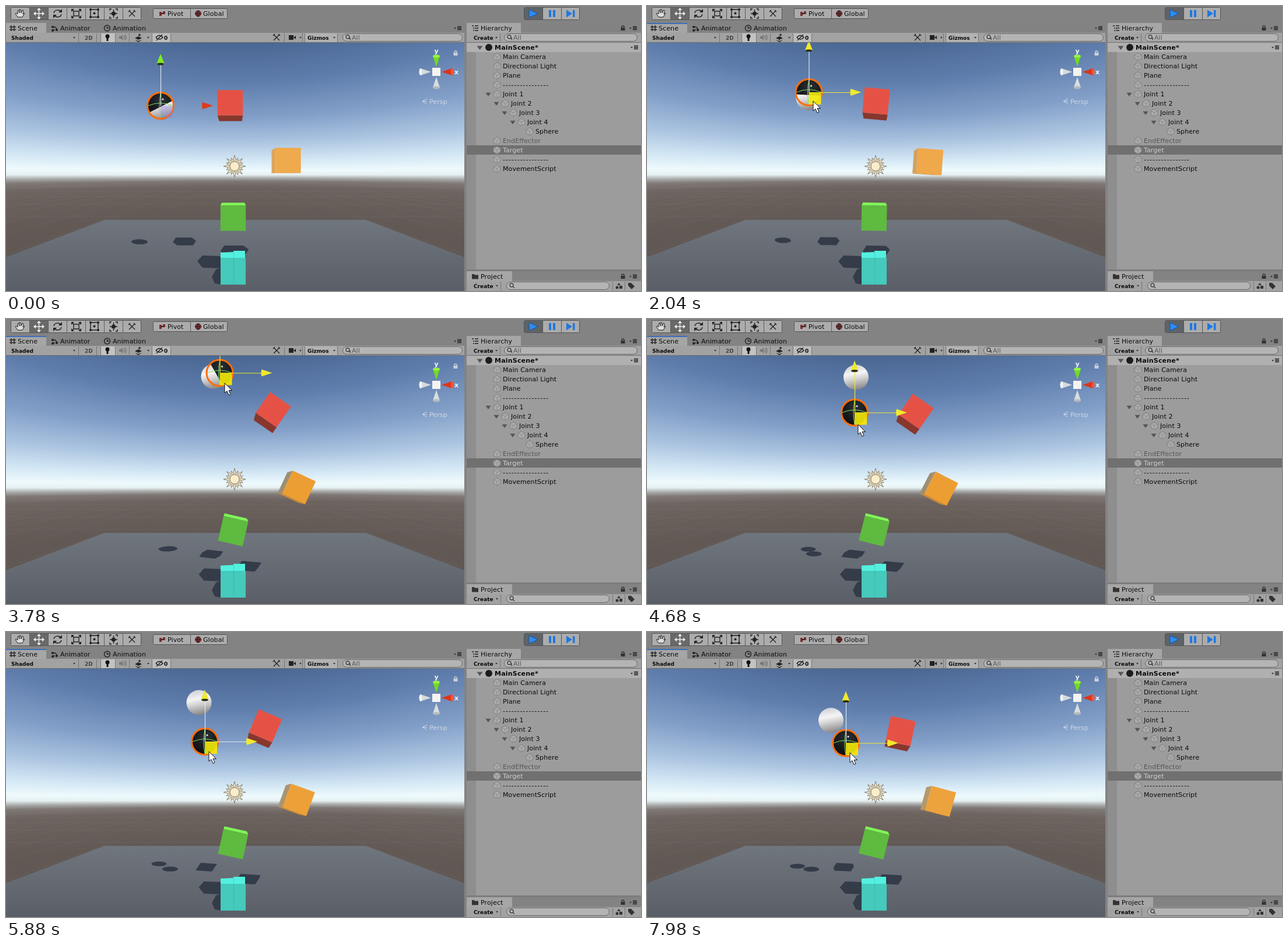
An HTML page that plays this animation: 1089 by 489 pixels, repeating every 8000 ms.

```html
<!DOCTYPE html>
<html lang="en">
<head>
<meta charset="utf-8">
<title>Joint chain following a target</title>
<style>
html, body { margin: 0; width: 100%; height: 100%; overflow: hidden; background: #838383; }
svg { display: block; width: 100vw; height: 100vh; font: 11px "DejaVu Sans", sans-serif; letter-spacing: .1px; }
text { white-space: pre; }
.s { font-size: 9px; font-weight: bold; letter-spacing: 0; }
.b { font-weight: bold; letter-spacing: .2px; }
.d { letter-spacing: .97px; }
.line { fill: none; stroke: #222; stroke-width: 1.4; }
</style>
</head>
<body>
<svg viewBox="0 0 1089 489">
  <defs>
    <linearGradient id="skyFill" gradientUnits="userSpaceOnUse" x1="0" y1="63" x2="0" y2="489">
      <stop offset="0" stop-color="#4a6793"/>
      <stop offset=".16" stop-color="#5f7dac"/>
      <stop offset=".3" stop-color="#829fc8"/>
      <stop offset=".4" stop-color="#abc4e0"/>
      <stop offset=".47" stop-color="#d2e6f4"/>
      <stop offset=".515" stop-color="#eefafd"/>
      <stop offset=".532" stop-color="#e6f0f2"/>
      <stop offset=".545" stop-color="#a9abaa"/>
      <stop offset=".558" stop-color="#7f7976"/>
      <stop offset=".58" stop-color="#6c635f"/>
      <stop offset=".7" stop-color="#625955"/>
      <stop offset="1" stop-color="#5b524f"/>
    </linearGradient>
    <linearGradient id="plane" x1="0" y1="0" x2="0" y2="1">
      <stop offset="0" stop-color="#70767e"/><stop offset="1" stop-color="#5a5f67"/>
    </linearGradient>
    <linearGradient id="white" x1=".4" y1="0" x2=".6" y2="1">
      <stop offset="0" stop-color="#cfd1d6"/><stop offset=".35" stop-color="#f4f4f5"/>
      <stop offset=".55" stop-color="#d6d5d5"/><stop offset="1" stop-color="#858284"/>
    </linearGradient>
    <radialGradient id="black" cx=".55" cy=".3" r=".7">
      <stop offset="0" stop-color="#2c3034"/><stop offset="1" stop-color="#0b0d0f"/>
    </radialGradient>
    <clipPath id="view"><rect y="63" width="786" height="426"/></clipPath>
    <clipPath id="half"><rect id="side" y="-90" width="180" height="180"/></clipPath>
  </defs>

  <g id="ui"></g>

  <g clip-path="url(#view)">
    <g id="sky" fill="url(#skyFill)" shape-rendering="crispEdges"></g>
    <g id="grid" stroke="#9a918c" fill="none"></g>
    <path d="M169 367H617L786 431V489H0V431Z" fill="url(#plane)"/>
    <g id="shadows" fill="#343b49">
      <path id="greenShade" d="M328 438L337 428 366 429 374 440 369 450 337 449Z"/>
      <path d="M353 465L360 452 369 449V478L358 476Z"/>
      <path id="redShade"/><path id="orangeShade"/>
      <ellipse id="ballShade" rx="13" ry="4"/><ellipse id="targetShade" rx="13.5" ry="4.2"/>
    </g>
    <path d="M368 434V423L390 422V420H410V434Z" fill="#53f0e0"/>
    <path d="M368 432H411V478H368Z" fill="#45cabc"/>
    <path d="M390.500 421V478" stroke="#37a99e" opacity=".45"/>
    <g id="cubes"></g>
    <g id="sun" stroke="#8a8373" fill="#fbecca"></g>
    <g id="compass"></g>
    <circle id="target" r="22" fill="url(#black)"/>
    <g clip-path="url(#half)"><circle id="ball" r="21.500" fill="url(#white)"/></g>
    <g id="gizmo">
      <circle r="22.500" fill="none" stroke="#ff6d0a" stroke-width="3"/>
      <path d="M-21 0Q0 -9 21 0M0 -21Q-4 0 0 21" fill="none" stroke="#7be36b" stroke-width="1"/>
      <circle cx="4" cy="-11" r="1.500" fill="#e9edf0"/>
      <path id="yLine" d="M.5 0V-72" stroke-width="1.200"/>
      <path id="xLine" d="M0 .5H74" stroke-width="1.200"/>
      <rect id="handle" width="21" height="21"/>
      <g id="yCone"><path d="M0 -89L-6.500 -72Q0 -69 6.500 -72Z"/><ellipse cy="-71.500" rx="6" ry="2" fill="#2c3015"/></g>
      <path id="xCone" d="M90 0L72 -6Q70 0 72 6Z"/>
    </g>
  </g>
  <path id="cursor" d="M0 0V17L4 13.500 7 20.500 10 19 7 12.500H12.500Z" fill="#fff" stroke="#111"/>
</svg>

<script>
const $ = id => document.getElementById(id);
const set = (id, attrs) => { for (const k in attrs) $(id).setAttribute(k, attrs[k]); };
const rect = (x, y, w, h, fill, more = '') => `<rect x="${x}" y="${y}" width="${w}" height="${h}" fill="${fill}" ${more}/>`;
const path = (d, fill, more = '') => `<path d="${d}" fill="${fill}" ${more}/>`;
const line = (d, more = '') => `<path class="line" d="${d}" ${more}/>`;
const dot = (x, y, r, fill, more = '') => `<circle cx="${x}" cy="${y}" r="${r}" fill="${fill}" ${more}/>`;
const label = (x, y, s, cls = '', fill = '#0a0a0a') => `<text x="${x}" y="${y}" class="${cls}" fill="${fill}">${s}</text>`;
const button = (x, y, w, h, fill = '#acacac') => rect(x + .5, y + .5, w - 1, h - 1, fill, 'stroke="#555" rx="2"');
const down = (x, y, r = 2.5, fill = '#333') => path(`M${x - r} ${y - r / 2}h${2 * r}l${-r} ${1.4 * r}Z`, fill);
const menu = (x, y) => down(x - 4, y, 2) + line(`M${x} ${y - 2.5}h7m-7 2.500h7m-7 2.500h7`, 'stroke-width="1"');
const lock = (x, y, c = '#333') => rect(x - 3.500, y - 1, 7, 5, c) + line(`M${x - 2} ${y}v-2a2 2 0 0 1 4 0v2`, `style="stroke:${c}"`);
const lens = (x, y) => `<circle class="line" cx="${x}" cy="${y}" r="3" style="stroke:#444"/>` + line(`M${x + 2} ${y + 2}l3 3`, 'style="stroke:#444"');
const search = (x, y, w) => rect(x + .5, y + .5, w - 1, 13, '#b4b4b4', 'stroke="#666" rx="7"') + lens(x + 9, y + 6);
const wrench = (x, y) => line(`M${x - 5} ${y + 5}l10 -10m-10 0l10 10`, 'stroke-width="2"') + line(`M${x - 6} ${y - 3}l3 -3M${x + 3} ${y - 6}l3 3`);

function toolbar() {
  let s = rect(0, 0, 1089, 489, '#838383') + button(8, 2, 224, 22) + rect(41, 3, 31, 20, '#696969');
  for (let x = 40; x < 220; x += 32) s += rect(x, 3, 1, 20, '#5c5c5c');
  s += path('M20 19L16 13 18 12 20 14V8L22 7 23 12V6L25 6 26 12 28 7 30 8 29 14 32 12 28 19Z', '#ddd', 'stroke="#222"');
  s += line('M48 13H65M56.500 4.500V21.500', 'style="stroke:#eee"');
  s += path('M56.500 3l3.500 4h-7ZM56.500 23l3.500 -4h-7ZM47 13l4 -3.500v7ZM66 13l-4 -3.500v7Z', '#eee');
  s += line('M82 12a6.500 6 0 0 1 12 -2M95 14a6.500 6 0 0 1 -12 2', 'stroke-width="2"') + path('M96 5v6h-6ZM81 21v-6h6Z', '#222');
  s += line('M116 9h9v8h-9ZM113 6l3 3M128 6l-3 3M113 20l3 -3M128 20l-3 -3') + path('M112 5h5l-5 5ZM129 5h-5l5 5ZM112 21h5l-5 -5ZM129 21h-5l5 -5Z', '#222');
  s += line('M145 6h13v13h-13Z');
  for (const x of [145, 158]) for (const y of [6, 19]) s += dot(x, y, 2, '#222');
  s += dot(151.500, 12.500, 2, '#222');
  s += line('M184.500 6v14M178 13h13') + line('M178 8v-3h3M188 5h3v3M191 18v3h-3M181 21h-3v-3') + dot(184.500, 13, 3.500, '#222');
  s += wrench(216, 13);
  s += button(252, 4, 128, 18) + rect(316, 5, 1, 16, '#5c5c5c');
  s += path('M263 10h4v7h-4ZM269 9h4v5h-4Z', '#7c2c2c') + path('M266 12h4v2h-4Z', '#222') + label(277, 17, 'Pivot');
  s += dot(329.500, 13, 5, '#a33b3b', 'stroke="#512"') + line('M325 13h9M329.500 8q-4 5 0 10q4 -5 0 -10', 'stroke-width=".8"') + label(338, 17, 'Global');
  s += button(888, 2, 96, 22) + rect(889, 3, 31, 20, '#5e6368') + rect(920, 3, 1, 20, '#555') + rect(952, 3, 1, 20, '#555');
  s += path('M897 6L912 13 897 20Z', '#2f8cf0', 'stroke="#1452a0"') + path('M931 7h4v12h-4ZM938 7h4v12h-4Z', '#1f78e0');
  return s + path('M961 6.500L971 13 961 19.500ZM972 7h3.500v12h-3.500Z', '#1f78e0');
}

function sceneBars() {
  let s = rect(0, 29, 69, 18, '#a6a6a6') + rect(0, 46, 786, 17, '#a2a2a2') + rect(0, 62, 786, 1, '#6d6d6d');
  s += `<rect id="focus" y="29" width="69" height="2" fill="#3e6fb8"/>`;
  s += line('M9 33v10M14 33v10M6 36h11M6 40.500h11', 'stroke-width="1"') + label(20, 42, 'Scene');
  s += line('M80 36h4l4 4M80 41h4') + dot(80, 36, 2, '#222') + dot(87, 41, 2, '#222') + dot(80, 42, 2, '#222') + label(93, 42, 'Animator');
  s += `<circle class="line" cx="173.500" cy="38" r="5"/>` + line('M173.500 35v3h3') + label(183, 42, 'Animation') + menu(774, 38);
  s += label(9, 58, 'Shaded', 's') + down(117, 54, 2);
  for (const x of [124, 155, 162, 187, 211, 250, 282, 477, 508, 512, 568]) s += rect(x, 47, 1, 15, '#777');
  s += rect(163, 47, 24, 15, '#c3c3c3') + rect(251, 47, 31, 15, '#bdbdbd') + rect(513, 47, 55, 15, '#b2b2b2');
  s += label(135, 58, '2D', 's', '#444') + dot(174, 52, 3.500, '#111') + rect(172.500, 55, 3, 5, '#111');
  s += path('M194 52h3l3 -3v10l-3 -3h-3Z', '#777') + line('M202 51q2 3 0 6m2 -8q4 5 0 10', 'style="stroke:#777"');
  s += path('M221 55l6 -3 6 3 -6 3ZM221 58l6 2 6 -2 -6 4Z', '#222') + path('M229 47l1 2 2 .5 -2 1 -1 2 -1 -2 -2 -1 2 -.5Z', '#222') + down(244, 54, 2);
  s += line('M257 54q6 -7 12 0q-6 6 -12 0M258 59l10 -10', 'stroke-width="1"') + label(271, 58, '0', 's');
  s += wrench(464, 54) + rect(485, 50, 8, 8, '#222') + path('M493 54l4 -3v6Z', '#222') + down(505, 54, 2);
  s += label(517, 58, 'Gizmos', 's') + down(563, 54, 2);
  return s + search(577, 47, 206) + down(590, 55, 1.5) + label(593, 58, 'All', '', '#555');
}

const cubeIcon = (x, y) => path(`M${x} ${y - 6}l6 3v6l-6 4 -6 -4v-6Z`, '#ababab', 'stroke="#808080"') +
  line(`M${x - 6} ${y - 3}l6 3 6 -3M${x} ${y}v6`, 'style="stroke:#8a8a8a;stroke-width:1"');

function sidePanel() {
  let s = rect(790, 29, 93, 18, '#a6a6a6') + rect(790, 46, 299, 17, '#a2a2a2') + rect(790, 63, 299, 389, '#9c9c9c');
  s += rect(790, 63, 16, 389, '#8e8e8e') + rect(790, 63, 299, 16, '#b0b0b0') + rect(790, 62, 299, 1, '#707070') + rect(790, 239, 299, 16, '#707070');
  s += line('M799 34h3m2 0h6M801 38h2m1 0h6M801 42h2m1 0h6', 'stroke-width="1.500"') + label(814, 42, 'Hierarchy');
  s += lock(1058, 38) + menu(1075, 38) + label(802, 58, 'Create', 's') + down(841, 54, 2) + rect(847, 47, 1, 15, '#777');
  s += search(854, 47, 229) + down(867, 55, 1.5) + label(870, 58, 'All', '', '#555');
  s += down(812.500, 71, 5, '#555') + dot(828, 71, 6, '#1c1c1c') + label(838, 75, 'MainScene*', 'b') + menu(1077, 71);
  const dashes = '-'.repeat(16);
  const rows = [['Main Camera'], ['Directional Light'], ['Plane'], [dashes], ['Joint 1', 0, 1], ['Joint 2', 1, 1], ['Joint 3', 2, 1],
    ['Joint 4', 3, 1], ['Sphere', 4], ['EndEffector', 0, 0, '#555'], ['Target', 0, 0, '#cfcfcf'], [dashes], ['MovementScript']];
  rows.forEach(([name, depth = 0, open, color], i) => {
    const x = 842 + depth * 14, y = 87 + i * 16;
    if (open) s += down(x - 15, y, 4.5, '#555');
    s += cubeIcon(x, y) + label(x + 10, y + 4, name, name === dashes ? 'd' : '', color);
  });
  s += rect(790, 452, 299, 3, '#7c7c7c') + rect(790, 455, 78, 18, '#a6a6a6') + rect(790, 472, 299, 17, '#a2a2a2');
  s += path('M799 460h4l1 1.500h6v7h-11Z', '#333') + label(814, 468, 'Project') + lock(1058, 464) + menu(1075, 464);
  s += label(802, 484, 'Create', 's') + down(842, 480, 2) + rect(848, 473, 1, 15, '#777') + search(858, 473, 177);
  s += rect(1040, 473, 1, 15, '#777') + rect(1061, 473, 1, 15, '#777');
  s += path('M1051 475l3 4h-6Z', '#333') + dot(1048, 483, 2.500, '#333') + rect(1052, 480, 5, 5, '#333');
  return s + path('M1067 475h5l6 6 -5 5 -6 -6Z', '#333');
}

// The haze follows the view angle, so it widens towards the sides.
function skyStrips() {
  const horizon = 290, focal = 400, width = 6;
  let s = '';
  for (let x = 0; x < 786; x += width) {
    const k = Math.hypot(1, (x + width / 2 - 393) / focal);
    s += `<rect x="${x}" y="40" width="${width}" height="460" transform="matrix(1 0 0 ${k} 0 ${horizon * (1 - k)})"/>`;
  }
  return s;
}

function sceneDecor() {
  $('sky').innerHTML = skyStrips();
  let g = '';
  for (let i = -16; i <= 16; i++) g += `<path d="M${393 + i * 18} 306L${393 + i * 190} 489" opacity=".1"/>`;
  for (const y of [311, 318, 327, 340, 361]) g += `<path d="M0 ${y}H786" opacity=".1"/>`;
  $('grid').innerHTML = g;

  let rays = '';
  for (let i = 0; i < 16; i++) {
    const tip = i % 2 ? -15 : -19;
    rays += `<path d="M-2.200 -10L0 ${tip} 2.200 -10Z" transform="translate(392 275) rotate(${i * 22.5})"/>`;
  }
  $('sun').innerHTML = rays + '<circle cx="392" cy="275" r="11" fill="#cfc6ae" stroke="none"/><circle cx="392" cy="275" r="8"/>';

  const cone = (angle, fill, cap) => `<g transform="translate(738 113) rotate(${angle})">` +
    path('M0 -9L-6 -27H6Z', fill) + `<ellipse cy="-27" rx="6" ry="2.500" fill="${cap}"/></g>`;
  $('compass').innerHTML = cone(-90, '#d5dadd', '#f3f5f6') + cone(180, '#d9dddf', '#b4b9bd') + cone(0, '#6fdc1f', '#9af34b') +
    cone(90, '#df3419', '#f0553a') + rect(731, 106, 14, 14, '#f4f4f2') +
    label(734.500, 81, 'y', 'b', '#f4f6f8') + label(769, 117, 'x', 'b', '#f4f6f8') + lock(771, 81, '#c9d0da') +
    line('M722 159l-8 4.500 8 4.500M714 163.500h8', 'style="stroke:#cfd9e6;stroke-width:1"') + label(726, 168, 'Persp', '', '#cfd9e6');
}

// Rows: time, then the values. Monotone cubic between rows.
function track(rows) {
  const slope = (i, c) => (rows[i + 1][c] - rows[i][c]) / (rows[i + 1][0] - rows[i][0]);
  const tangent = (i, c) => {
    if (i === 0 || i === rows.length - 1) return 0;
    const a = slope(i - 1, c), b = slope(i, c);
    return a * b > 0 ? 2 * a * b / (a + b) : 0;
  };
  return t => {
    const last = rows[rows.length - 1];
    if (t >= last[0]) return last.slice(1);
    let i = 0;
    while (t >= rows[i + 1][0]) i++;
    const h = rows[i + 1][0] - rows[i][0], u = (t - rows[i][0]) / h, v = 1 - u;
    return rows[i].slice(1).map((p, k) => {
      const c = k + 1;
      return p * v * v * (1 + 2 * u) + rows[i + 1][c] * u * u * (3 - 2 * u) +
        h * u * v * (v * tangent(i, c) - u * tangent(i + 1, c));
    });
  };
}

const targetAt = track([[0, 265, 171], [1500, 265, 171], [2040, 277.5, 148], [2820, 327, 116], [3780, 366.5, 92.5], [3960, 368, 90],
  [4140, 368, 90], [4680, 356, 160.5], [4980, 350, 172], [5880, 341, 188], [6600, 341, 190.5]]);
const cursorAt = track([[0, 1102, 50], [60, 1078, 56], [400, 560, 140], [840, 266, 188], [960, 260, 167], [1140, 273, 186],
  [1500, 273, 186], [2040, 285, 163], [2820, 336, 130], [3780, 375, 110], [3960, 377, 108], [4140, 377, 108], [4680, 362, 181],
  [4980, 357, 190], [5880, 348, 205], [6600, 348, 207]]);
// ball x y, red x y angle, orange x y angle, green angle
const armAt = track([
  [0, 266.5, 174, 384.5, 166, 0, 484, 265, 0, 0],
  [1500, 266.5, 174, 384.5, 166, 0, 484, 265, 0, 0],
  [2040, 277, 157.5, 393, 163, 5, 485, 267, 4, 1],
  [2820, 303, 129, 419.5, 157, 17, 493, 275, 14, 7],
  [3780, 356, 98.5, 458.5, 155.5, 34.5, 502.5, 289, 25, 13],
  [4680, 358.5, 100, 461.5, 158.5, 34.5, 504.5, 291, 27, 14],
  [5880, 331, 121, 445, 161, 23, 502, 288, 20, 12.5],
  [6660, 324, 134, 441, 164, 19, 502.5, 289, 18, 13],
  [7980, 315.5, 151.5, 435, 170, 12, 503.5, 290.5, 15, 14]
]);

const VANISH = [391, 291], DEPTH = .095, HALF = 21.7;
const poly = pts => 'M' + pts.map(p => p.map(n => n.toFixed(1)).join(' ')).join('L') + 'Z';

function corners(x, y, deg) {
  const c = Math.cos(deg * Math.PI / 180) * HALF, s = Math.sin(deg * Math.PI / 180) * HALF;
  return [[-1, -1], [1, -1], [1, 1], [-1, 1]].map(([i, j]) => [x + i * c - j * s, y + i * s + j * c]);
}

// sides: colours of top, right, bottom, left
function cube(x, y, deg, front, sides) {
  const f = corners(x, y, deg);
  const b = f.map(p => p.map((n, i) => n + DEPTH * (VANISH[i] - n)));
  let out = '';
  sides.forEach((fill, i) => {
    const j = (i + 1) % 4, mx = (f[i][0] + f[j][0]) / 2, my = (f[i][1] + f[j][1]) / 2;
    const facing = (mx - x) * (VANISH[0] - mx) + (my - y) * (VANISH[1] - my);
    if (facing > 0) out += path(poly([f[i], f[j], b[j], b[i]]), fill);
  });
  return out + path(poly(f), front);
}

function hull(pts) {
  pts.sort((a, b) => a[0] - b[0] || a[1] - b[1]);
  const chain = list => {
    const out = [];
    for (const p of list) {
      while (out.length > 1) {
        const a = out[out.length - 2], b = out[out.length - 1];
        if ((b[0] - a[0]) * (p[1] - a[1]) - (b[1] - a[1]) * (p[0] - a[0]) > 0) break;
        out.pop();
      }
      out.push(p);
    }
    return out.slice(0, -1);
  };
  return chain(pts).concat(chain(pts.slice().reverse()));
}

function cubeShade(x, y, deg, scale) {
  const pts = [];
  for (const [dx, dy] of corners(0, 0, deg)) for (const k of [-1, 1])
    pts.push([x + scale * (.655 * dx + .185 * dy - 2.8 * k), y + scale * (.132 * dy + 4.2 * k)]);
  return poly(hull(pts));
}

const ballShade = (x, y) => ({ cx: 280 + (x - 366) * .655 + (y - 92) * .185, cy: 394 + (y - 92) * .132 });
const mix = (a, b, u) => `rgb(${a.map((n, i) => Math.round(n + (b[i] - n) * u))})`;

function draw(t) {
  const [tx, ty] = targetAt(t), [cx, cy] = cursorAt(t);
  const [bx, by, rx, ry, ra, ox, oy, oa, ga] = armAt(t);
  const drag = t >= 1500, hover = t >= 900;
  const bent = Math.min(1, oa / 25);

  set('focus', { visibility: drag ? 'visible' : 'hidden' });
  set('cursor', { transform: `translate(${cx} ${cy})` });
  set('target', { cx: tx, cy: ty });
  set('ball', { cx: bx, cy: by });
  const turn = Math.atan2(by - ty, bx - tx) * 180 / Math.PI;
  set('side', { transform: `translate(${(tx + bx) / 2} ${(ty + by) / 2}) rotate(${turn})` });

  const yellow = '#f1e92c';
  set('gizmo', { transform: `translate(${tx} ${ty})` });
  set('yCone', { fill: drag ? yellow : '#7cf01c' });
  set('xCone', { fill: drag ? yellow : '#e2391c' });
  set('yLine', { stroke: t > 3300 && t < 5300 ? yellow : '#dfe7ee' });
  set('xLine', { stroke: !drag ? 'none' : t > 5300 && t < 7000 ? '#dfe7ee' : yellow });
  set('handle', hover ? { fill: '#f6ea0a', opacity: .9 } : { fill: '#7d74e8', opacity: .3 });

  $('cubes').innerHTML =
    cube(389.5, 364, ga, '#5fba40', ['#80f657', '#4f9c36', '#468a30', '#4f9c36']) +
    cube(ox, oy, oa, mix([239, 170, 78], [236, 158, 50], bent),
      ['#f7b95f', '#c98730', '#c98a38', mix([219, 166, 95], [158, 143, 115], bent)]) +
    cube(rx, ry, ra, '#e55245', ['#f0675a', '#a84237', '#87372d', '#a84237']);

  set('ballShade', ballShade(bx, by));
  set('targetShade', ballShade(tx, ty));
  set('redShade', { d: cubeShade(306 + (rx - 384.5) * .62, 404 - (ra > 3 ? .5 : 0), ra, .95) });
  set('orangeShade', { d: cubeShade(392 + (ox - 484) * 1.27, 419 + (oy - 265) * .22, oa, 1.15) });
  set('greenShade', { transform: `translate(${ga * .2} 0)` });
}

const LOOP = 8000, STEP = 60;
$('ui').innerHTML = toolbar() + sceneBars() + sidePanel();
sceneDecor();
const start = performance.now();
function tick() {
  const t = (performance.now() - start) % LOOP;
  draw(Math.floor(t / STEP) * STEP);
  requestAnimationFrame(tick);
}
tick();
</script>
</body>
</html>
```
